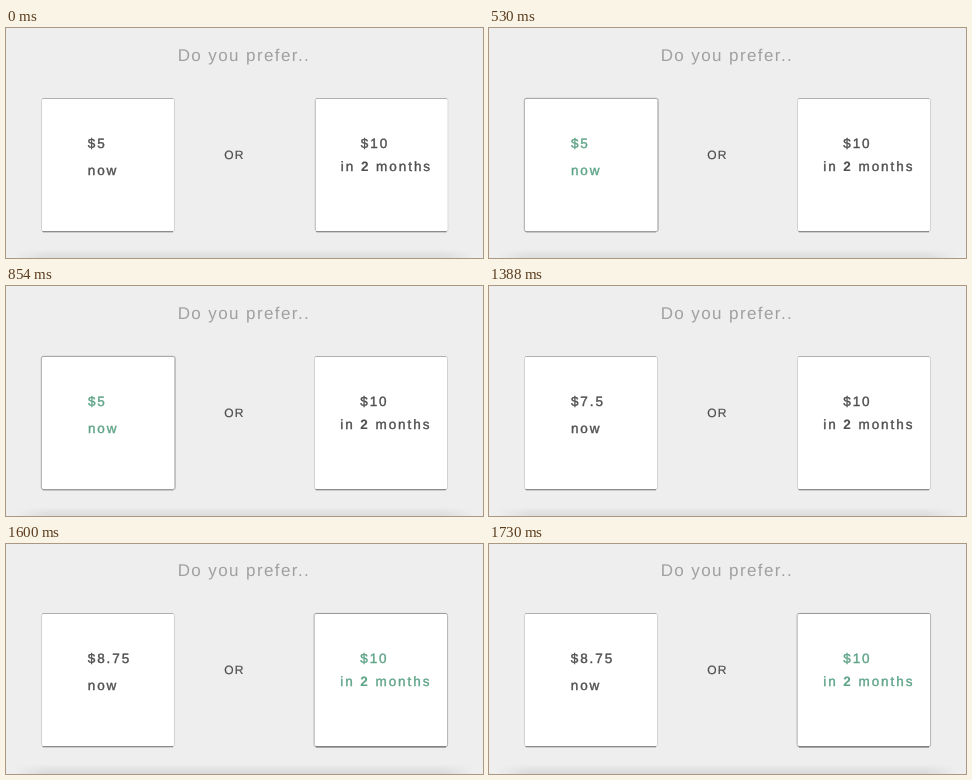
Recreate the animation shown at these times as an HTML page. Size 477x230 px, loop 2.14 s.

```html
<!DOCTYPE html>
<html lang="en">
<head>
<meta charset="utf-8">
<title>Do you prefer</title>
<style>
  html, body { margin: 0; width: 100%; height: 100%; overflow: hidden; background: #eee; }
  svg { display: block; width: 100vw; height: 100vh; }
  text { font: 13.5px "Liberation Sans", Arial, sans-serif; letter-spacing: 1.95px; fill: #505050; stroke: #505050; stroke-width: .4px; text-rendering: geometricPrecision; }
  .title { font-size: 17px; letter-spacing: 1.4px; fill: #a0a0a0; stroke: none; }
  .or { font-size: 12px; letter-spacing: 1.2px; fill: #4c4c4c; stroke: #4c4c4c; stroke-width: .2px; }
  .bold { font-weight: bold; stroke-width: .1px; }
  .picked text { fill: #5fa488; stroke: #5fa488; }
  .face { fill: #fff; stroke: #c8c8c8; stroke-width: .8px; }
  .foot { fill: none; stroke: #8c8c8c; }
  .edge { fill: none; stroke: #a6a6a6; stroke-width: .8px; }
  .soft { fill: none; stroke: #000; stroke-opacity: .14; }

  /* hard cuts between four rounds */
  .a, .b, .c, .d, .e, .page, .right { animation: 2140ms step-end infinite; }
  .a { animation-name: a; }
  .b { animation-name: b; }
  .c { animation-name: c; }
  .d { animation-name: d; }
  .e { animation-name: e; }
  .page { animation-name: lift; }
  .right { animation-name: nudge; }
  @keyframes a { 0% { visibility: visible } 24.766%, 100% { visibility: hidden } }
  @keyframes b { 0% { visibility: hidden } 24.766% { visibility: visible } 50%, 100% { visibility: hidden } }
  @keyframes c { 0% { visibility: hidden } 50% { visibility: visible } 74.766%, 100% { visibility: hidden } }
  @keyframes d { 0% { visibility: hidden } 74.766%, 100% { visibility: visible } }
  @keyframes e { 0% { visibility: visible } 74.766%, 100% { visibility: hidden } }
  @keyframes lift { 0% { transform: none } 74.766%, 100% { transform: translateY(-1px) } }
  @keyframes nudge { 0% { transform: translateX(.6px) } 24.766%, 100% { transform: none } }
</style>
</head>
<body>
<svg viewBox="0 0 477 230" preserveAspectRatio="none">
  <defs>
    <linearGradient id="shade" x2="0" y2="1">
      <stop offset="0" stop-color="#000" stop-opacity="0"/>
      <stop offset="1" stop-color="#000" stop-opacity=".085"/>
    </linearGradient>
    <linearGradient id="fade">
      <stop offset="0" stop-color="#000"/>
      <stop offset=".07" stop-color="#fff"/>
      <stop offset=".93" stop-color="#fff"/>
      <stop offset="1" stop-color="#000"/>
    </linearGradient>
    <mask id="ends"><rect x="8" y="215" width="461" height="18" fill="url(#fade)"/></mask>
    <g id="card">
      <rect class="face" x=".5" y=".5" width="133" height="133" rx="2"/>
      <path class="edge" d="M1.5 .5H132"/>
      <path class="foot" d="M1.5 133.5H132"/>
      <path class="soft" d="M2 134.5H132"/>
    </g>
  </defs>

  <rect width="477" height="230" fill="#eee"/>

  <g class="page">
    <g mask="url(#ends)"><rect x="8" y="221" width="461" height="10" fill="url(#shade)"/></g>

    <text class="title" x="171.7" y="33">Do you prefer..</text>
    <text class="or" x="218.2" y="131.3">OR</text>

    <use href="#card" x="35" y="70"/>
    <rect class="edge b" x="35.3" y="70.3" width="134" height="133.4" rx="2"/>
    <g class="a">
      <text x="81.7" y="120">$5</text>
      <text x="81.7" y="146.5">now</text>
    </g>
    <g class="b picked">
      <text x="81.9" y="120">$5</text>
      <text x="81.9" y="146.5">now</text>
    </g>
    <g class="c">
      <text x="81.9" y="120">$7.5</text>
      <text x="81.9" y="146.5">now</text>
    </g>
    <g class="d">
      <text x="81.7" y="120">$8.75</text>
      <text x="81.7" y="146.5">now</text>
    </g>

    <g class="right">
      <use href="#card" x="308" y="70"/>
      <path class="edge a" d="M308.5 72V202"/>
      <g class="d">
        <rect class="soft" x="307.8" y="70.3" width="133.9" height="133.6" rx="2"/>
        <path class="soft" d="M310 204.5H440"/>
      </g>
      <g class="e">
        <text x="354.2" y="120">$10</text>
        <text x="334.2" y="143.2">in <tspan class="bold">2</tspan> months</text>
      </g>
      <g class="d picked">
        <text x="354.2" y="120">$10</text>
        <text x="334.2" y="143.2">in <tspan class="bold">2</tspan> months</text>
      </g>
    </g>
  </g>
</svg>
</body>
</html>
```
